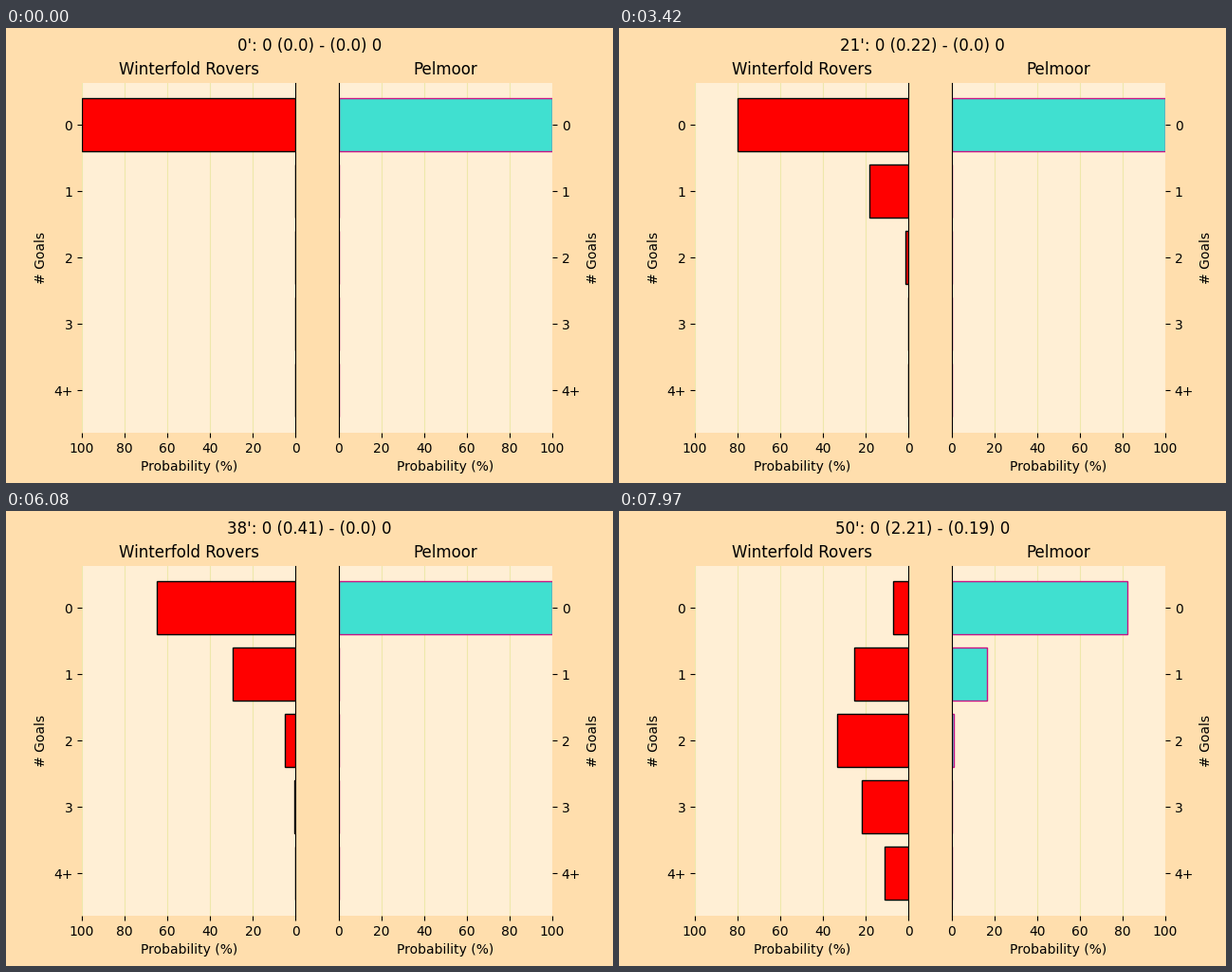
A matplotlib script that plays this animation: 640 by 480 pixels, repeating every 8000 ms.

```python
import matplotlib.pyplot as plt
import numpy as np
from matplotlib.animation import FuncAnimation

LOOP_MS = 8000
INTERVAL = 20
HOLD_MS = 160   # a minute without shots
STEP_MS = 30    # one step of a minute with shots
STEPS = 5
LAST_MINUTE = 50
ROWS = ["0", "1", "2", "3", "4+"]

# minute -> scoring chance of each shot
HOME_SHOTS = {
    4: [.022], 11: [.053], 14: [.097], 21: [.051], 26: [.141],
    37: [.05], 41: [.05], 45: [.06, .12], 47: [.125, .12], 48: [.12],
    49: [.5], 50: [.7055],
}
AWAY_SHOTS = {39: [.11], 45: [.042], 49: [.0335]}


def add_shot(dist, p):
    """Goal distribution after one more shot; the last entry is open-ended."""
    new = dist * (1 - p)
    new[1:] += dist[:-1] * p
    new[-1] += dist[-1] * p
    return new


def match_history(shots):
    """Distribution and expected goals at the end of every minute."""
    dist, total = np.eye(len(ROWS))[0], 0.0
    history = []
    for minute in range(LAST_MINUTE + 1):
        for p in shots.get(minute, []):
            dist = add_shot(dist, p)
            total += p
        history.append((100 * dist, total))
    return history


def build_schedule():
    """Start time, minute and blend of every distinct picture."""
    schedule, now = [], 0
    for minute in range(LAST_MINUTE + 1):
        if minute in HOME_SHOTS or minute in AWAY_SHOTS:
            for step in range(1, STEPS + 1):
                schedule.append((now, minute, step / STEPS))
                now += STEP_MS
        else:
            schedule.append((now, minute, 1.0))
            now += HOLD_MS
    return schedule


home, away = match_history(HOME_SHOTS), match_history(AWAY_SHOTS)
schedule = build_schedule()
starts = [entry[0] for entry in schedule]

fig, (ax_home, ax_away) = plt.subplots(1, 2, figsize=(6.4, 4.8), dpi=100)
fig.set_facecolor("navajowhite")
title = fig.suptitle("")


def setup(ax, name, color, edge, inner):
    ax.set_facecolor("papayawhip")
    ax.set_axisbelow(True)
    ax.grid(axis="x", color="palegoldenrod")
    bars = ax.barh(range(len(ROWS)), [0] * len(ROWS), color=color, edgecolor=edge)
    for side, spine in ax.spines.items():
        spine.set_visible(side == inner)
    ax.set_xlim((100, 0) if inner == "right" else (0, 100))
    ax.set_ylim(4.64, -.64)
    ax.set_xticks(range(0, 101, 20))
    ax.set_yticks(range(len(ROWS)), ROWS)
    ax.set_title(name)
    ax.set_xlabel("Probability (%)")
    ax.set_ylabel("# Goals")
    return bars


home_bars = setup(ax_home, "Winterfold Rovers", "red", "black", "right")
away_bars = setup(ax_away, "Pelmoor", "turquoise", "mediumvioletred", "left")
ax_away.yaxis.tick_right()
ax_away.yaxis.set_label_position("right")


def set_bars(bars, history, minute, blend):
    before, after = history[max(minute - 1, 0)][0], history[minute][0]
    for bar, width in zip(bars, before + (after - before) * blend):
        bar.set_width(width)


def update(frame):
    now = frame * INTERVAL + INTERVAL / 2
    _, minute, blend = schedule[np.searchsorted(starts, now, side="right") - 1]
    set_bars(home_bars, home, minute, blend)
    set_bars(away_bars, away, minute, blend)
    home_xg, away_xg = round(home[minute][1], 2), round(away[minute][1], 2)
    title.set_text(f"{minute}': 0 ({home_xg}) - ({away_xg}) 0")
    return [*home_bars, *away_bars, title]


anim = FuncAnimation(fig, update, frames=LOOP_MS // INTERVAL, interval=INTERVAL,
                     repeat=True, repeat_delay=0)
plt.show()
```
